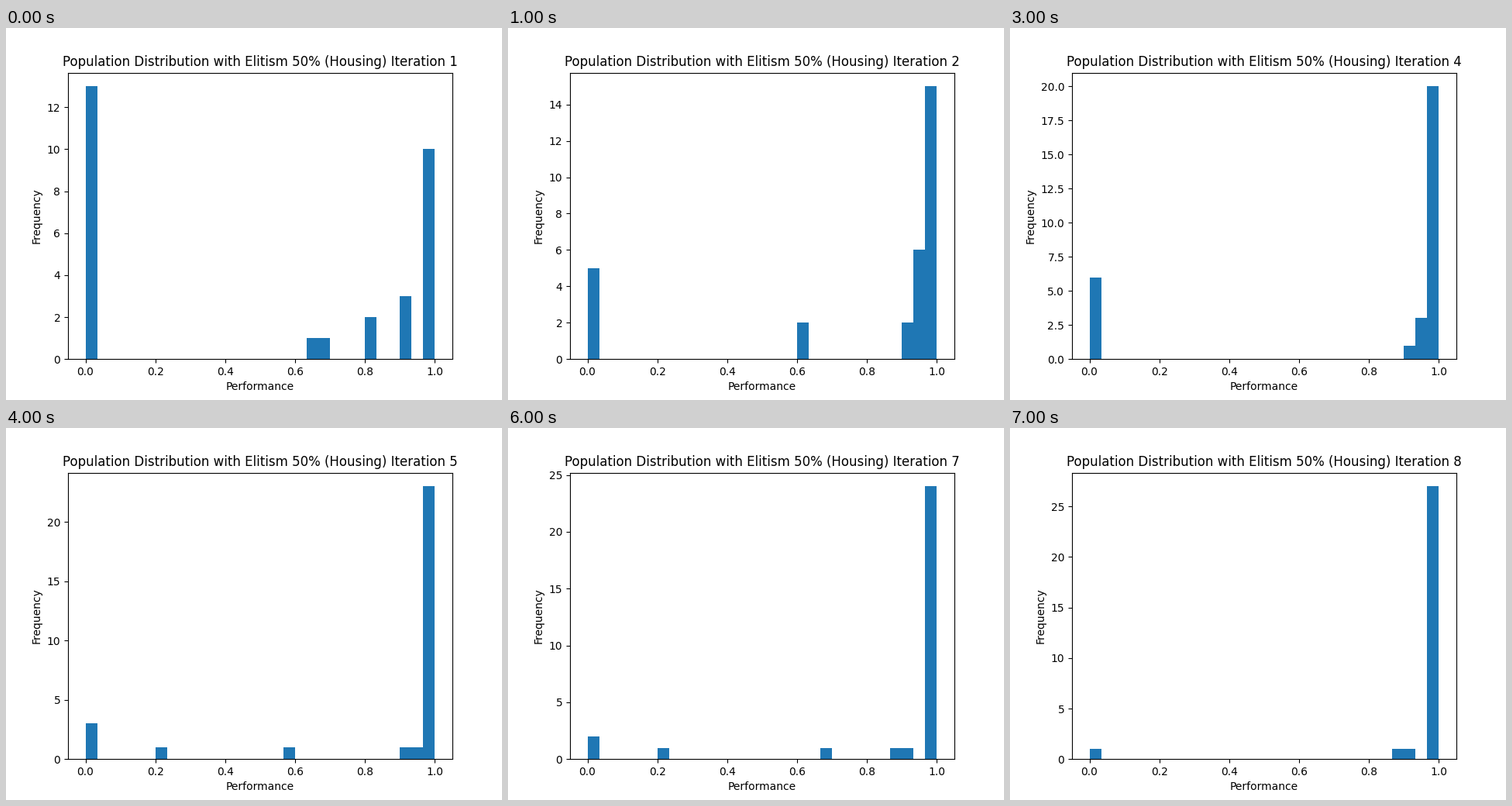
Write a matplotlib script that moves like this. It is 640x480 px and loops after 8 s.

```python
import numpy as np
import matplotlib.pyplot as plt
from matplotlib.animation import FuncAnimation

SIZE = 30  # individuals per population, also the number of bins

# Per iteration: how many individuals failed, and the bins of the middling ones.
# Everyone else sits in the top bin.
ITERATIONS = [
    (13, [19, 20] + [24] * 2 + [27] * 3),
    (5, [18] * 2 + [27] * 2 + [28] * 6),
    (11, [28] * 4),
    (6, [27] + [28] * 3),
    (3, [6, 17, 27, 28]),
    (3, [20, 26, 27, 28]),
    (2, [6, 20, 26, 27]),
    (1, [26, 27]),
]

plt.rcParams["font.family"] = "DejaVu Sans"
fig, ax = plt.subplots(figsize=(6.4, 4.8), dpi=100)


def scores(failed, middling):
    """Performance of every individual, at the centre of its bin."""
    best = SIZE - failed - len(middling)
    bins = [0] * failed + middling + [SIZE - 1] * best
    return (np.array(bins) + 0.5) / SIZE


def draw(i):
    ax.clear()
    ax.hist(scores(*ITERATIONS[i]), bins=SIZE, range=(0, 1), color="#1f77b4")
    ax.set_title(
        f"Population Distribution with Elitism 50% (Housing) Iteration {i + 1}"
    )
    ax.set_xlabel("Performance")
    ax.set_ylabel("Frequency")
    return ax.patches


anim = FuncAnimation(
    fig,
    draw,
    frames=len(ITERATIONS),
    init_func=lambda: draw(0),
    interval=1000,
    repeat=True,
    repeat_delay=0,
    blit=False,
)

plt.show()
```
